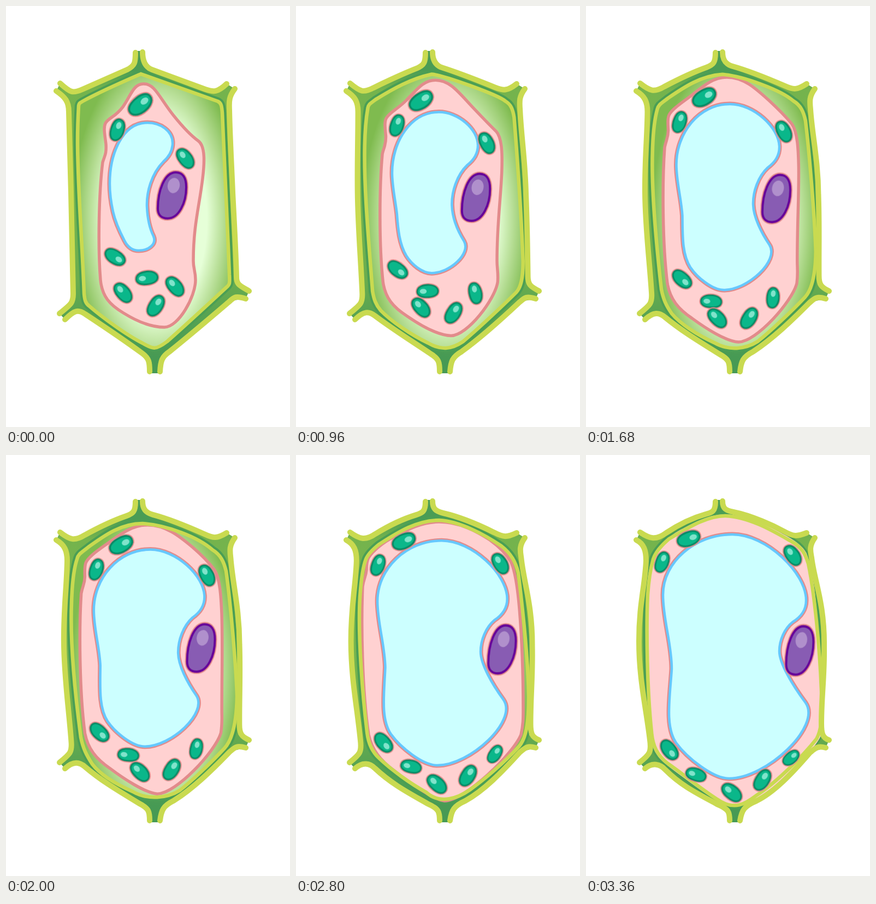
Recreate the animation shown at these times as an HTML page without scripts. Size 520 by 768 pixels, loop 4 s.

```html
<!DOCTYPE html>
<html lang="en">
<head>
<meta charset="utf-8">
<title>Plant cell filling with water</title>
<style>
html, body { margin: 0; width: 100%; height: 100%; overflow: hidden; background: #fff; }
svg { display: block; width: 520px; height: 768px; }
path, .move { animation: 4s infinite; }

.wall { fill: url(#wallTint); animation-name: wall; }
.seam { fill: none; stroke: #4a9e55; stroke-width: 14.5; animation-name: inner; }
.space { fill: url(#glow); animation-name: inner; }
.inner { fill: none; stroke: #c9da50; stroke-width: 6.5; animation-name: inner; }
.outer { fill: none; stroke: #c9da50; stroke-width: 10; stroke-linecap: round; animation-name: outer; }
.plasma { fill: #ffd1d1; stroke: #e28b8b; stroke-width: 5.5; animation-name: plasma; }
.water { fill: #cff; stroke: #66c8ff; stroke-width: 4.5; animation-name: water; }
.water.rim { stroke: #e28b8b; stroke-width: 9; }
.move { animation-name: move; }
.rim { stroke: #e28b8b; }

/* one step per 80 ms, then a hold from 84% */
@keyframes move {
  0% { transform: var(--a); animation-timing-function: steps(12); }
  24% { transform: var(--b); animation-timing-function: steps(13); }
  50% { transform: var(--c); animation-timing-function: steps(17); }
  84%, to { transform: var(--d); }
}
@keyframes water {
  0% {
    d: path("M259,213 C283,213 305,228 305,250 C305,266 297,276 288,284 C266,306 257,340 258,366 C259,390 264,408 270,420 C276,434 262,446 243,446 C230,446 222,438 217,428 C207,409 200,393 196,375 C192,357 190,341 190,324 C190,270 213,213 259,213Z");
    animation-timing-function: steps(42);
  }
  84%, to {
    d: path("M268,145 C330,145 403,215 403,265 C403,283 394,295 378,305 C364,316 354,337 354,358 C354,380 378,420 402,452 C432,495 330,590 262,590 C232,590 185,552 165,525 C144,495 154,440 157,390 C157,345 141,300 141,255 C141,195 200,145 268,145Z");
  }
}
@keyframes plasma {
  0% {
    d: path("M252,142 C273,142 281,168 307,200 C324,221 338,236 352,246 C366,256 363,290 360,315 C354,365 343,400 343,465 C343,480 347,483 347,500 C347,530 316,586 290,586 C262,586 236,573 215,560 C190,545 176,530 173,500 C168,440 170,340 177,285 C181,272 184,270 183,252 C181,235 178,222 182,214 C187,204 200,203 214,184 C229,163 233,142 252,142Z");
    animation-timing-function: steps(35);
  }
  70% {
    d: path("M262,122 C300,122 332,140 355,155 C373,168 385,180 393,194 C402,212 406,245 409,280 C414,340 416,390 416,465 C416,480 416,492 412,510 C398,545 310,630 272,631 C252,629 205,596 180,576 C155,558 139,538 133,510 C121,430 119,310 122,240 C124,225 128,222 129,210 C129,200 130,192 133,187 C140,176 158,160 178,150 C205,135 232,122 262,122Z");
    stroke: #e28b8b;
    animation-timing-function: steps(7);
  }
  84%, to {
    d: path("M255,111 C290,111 330,130 358,146 C380,157 394,167 401,180 C412,205 417,250 420,290 C427,370 431,420 431,470 C431,485 430,500 427,512 C413,542 320,637 270,639 C245,637 195,597 165,575 C140,557 124,545 120,510 C112,430 110,310 114,245 C115,228 117,215 120,203 C123,192 125,185 129,178 C136,166 160,145 180,136 C208,121 230,111 255,111Z");
    stroke: #ffd1d1;
  }
}
@keyframes inner {
  0% {
    d: path("M247,124 C247,124 388,174 388,174 C394,177 395,182 396,195 C398,260 405,380 409,490 C410,506 409,508 406,511 C380,535 320,590 295,612 C275,627 270,627 250,615 C220,600 175,567 152,547 C145,542 144,535 143,525 C139,420 131,330 131,245 C131,220 132,200 133,182 C134,177 135,177 140,174 C175,155 210,140 247,124Z");
    animation-timing-function: steps(25);
  }
  50% {
    d: path("M250,125 C295,128 352,150 378,173 C393,182 399,195 403,212 C411,270 421,380 423,440 C422,490 414,520 400,535 C375,562 340,595 318,612 C295,626 260,630 232,614 C200,600 172,582 158,564 C147,547 141,535 137,515 C127,440 117,340 120,270 C121,235 125,205 130,190 C132,180 140,177 152,167 C180,147 210,125 250,125Z");
    animation-timing-function: steps(10);
  }
  70% {
    d: path("M262,119 C300,121 345,145 376,166 C394,180 402,195 407,215 C415,280 425,370 426,440 C426,490 421,518 408,532 C380,562 345,592 318,611 C298,625 264,639 238,615 C210,600 174,574 152,553 C138,540 132,525 130,505 C122,440 113,330 117,260 C119,230 122,205 128,190 C132,180 142,171 152,163 C185,142 220,119 262,119Z");
    animation-timing-function: steps(7);
  }
  84%, to {
    d: path("M255,111 C300,113 345,140 375,157 C396,168 402,182 407,198 C418,250 428,350 431,430 C432,480 432,500 422,518 C395,552 345,600 312,621 C292,636 272,650 240,628 C210,609 175,580 150,563 C130,548 122,530 120,505 C112,430 110,320 113,255 C115,225 118,208 123,190 C127,178 138,165 152,153 C185,134 220,111 255,111Z");
  }
}
@keyframes outer {
  0% {
    d: path("M237,85 C237,103 236,109 222,116 C195,128 165,141 140,152 C122,160 118,158 99,141 M92,155 C108,166 115,174 115,193 C116,240 118,290 119,340 C120,400 122,460 123,525 C123,542 119,544 98,561 M108,572 C125,555 132,553 145,562 C180,585 220,612 250,634 C262,643 263,650 263,667 M282,667 C283,648 285,640 300,630 C340,598 375,568 408,540 C418,531 420,528 439,534 M445,520 C428,510 422,508 422,495 C421,450 418,400 415,340 C413,290 410,240 409,190 C408,172 409,164 419,151 M404,142 C387,158 380,157 365,152 C340,143 300,128 267,116 C254,111 250,98 250,84");
    animation-timing-function: steps(42);
  }
  84%, to {
    d: path("M237,85 C237,103 231,105 219,108 C190,116 162,132 147,142 C128,156 117,153 99,141 M92,155 C106,162 110,174 110,193 C108,240 97,270 97,340 C97,410 110,460 117,520 C120,542 117,546 98,561 M108,572 C122,560 136,564 145,574 C175,604 205,618 240,637 C262,646 263,652 263,667 M282,667 C285,648 290,640 312,631 C345,615 378,580 410,543 C421,534 424,530 439,534 M445,520 C433,516 431,508 431,490 C431,440 437,400 436,350 C437,270 418,230 413,187 C411,176 408,166 419,151 M404,142 C386,149 380,149 362,139 C345,130 305,111 270,104 C256,101 250,98 250,84");
  }
}
@keyframes wall {
  0% {
    d: path("M238,82 L237,100 L224,115 Q180,134 135,154 L116,155 L99,141 L92,155 L112,172 Q115,260 119,340 Q121,450 122,545 L98,561 L108,572 L128,557 L150,565 Q200,599 250,634 L263,650 L263,670 L282,670 L283,650 L300,630 Q355,583 410,538 L439,534 L445,520 L421,505 Q418,430 415,340 Q411,260 409,175 L419,151 L404,142 L390,155 L365,152 Q315,134 265,115 L251,100 L250,82Z");
    animation-timing-function: steps(42);
  }
  84%, to {
    d: path("M238,82 L237,97 L222,107 Q180,121 146,143 L118,151 L99,141 L92,155 L109,172 Q97,270 97,340 Q97,410 118,545 L98,561 L108,572 L128,563 L146,573 Q185,612 247,639 L263,650 L263,670 L282,670 L283,650 L308,633 Q360,604 410,543 L439,534 L445,520 L428,512 Q436,420 436,350 Q435,265 411,175 L419,151 L404,142 L385,147 L365,141 Q315,113 268,104 L251,97 L250,82Z");
  }
}
</style>
</head>
<body>
<svg viewBox="0 0 520 768" xmlns="http://www.w3.org/2000/svg">
  <defs>
    <linearGradient id="wallTint" gradientUnits="userSpaceOnUse" x1="0" y1="82" x2="0" y2="670">
      <stop offset="0" stop-color="#4a9c55"/>
      <stop offset=".06" stop-color="#4a9c55"/>
      <stop offset=".12" stop-color="#74b34d"/>
      <stop offset=".4" stop-color="#7ab74e"/>
      <stop offset=".71" stop-color="#6aad4e"/>
      <stop offset=".83" stop-color="#55a253"/>
      <stop offset=".95" stop-color="#479a54"/>
    </linearGradient>
    <radialGradient id="glow" gradientUnits="userSpaceOnUse" cx="0" cy="0" r="1" gradientTransform="translate(275 388) scale(155 300)">
      <stop offset=".6" stop-color="#e6ffd8"/>
      <stop offset=".8" stop-color="#b4dc92"/>
      <stop offset="1" stop-color="#7fbb4f"/>
    </radialGradient>
    <clipPath id="shell"><path class="wall"/></clipPath>
    <path id="bean" d="M-19.5,1 C-19.5,-8 -8,-12 3,-11.5 C13,-11 19.5,-6 19.5,0 C19.5,8 10,11.5 -2,11.5 C-12,11.5 -19.5,8 -19.5,1Z"/>
    <path id="core" d="M7,-42 C19,-42 26,-33 26,-15 C26,14 12,42 -8,42 C-20,42 -26,35 -26,24 C-26,-8 -14,-42 7,-42Z"/>
    <g id="plastid">
      <use href="#bean" class="rim" stroke-width="6.5"/>
      <use href="#bean" fill="#0ab78a" stroke="#0a8a66" stroke-width="3"/>
      <ellipse cx="-8.3" cy=".5" rx="6.5" ry="4.7" fill="#80e3cb"/>
    </g>
  </defs>

  <path class="wall"/>
  <g clip-path="url(#shell)"><path class="seam"/></g>
  <path class="space"/>
  <path class="plasma"/>
  <path class="inner"/>
  <path class="outer"/>
  <path class="water rim"/>
  <path class="water"/>

  <g class="move" style="--a:translate(304px,345.5px) scale(1,1);--b:translate(329.5px,349px) scale(.99,1.02);--c:translate(357px,352px) scale(.98,1.03);--d:translate(391.5px,356.5px) scale(.96,1.05)">
    <use href="#core" class="rim" stroke-width="8"/>
    <use href="#core" fill="#885cb3" stroke="#609" stroke-width="4"/>
    <ellipse cx="3" cy="-18" rx="11" ry="14" transform="rotate(12 3 -18)" fill="#b090cc"/>
  </g>

  <use href="#plastid" class="move" style="--a:translate(246px,180px) rotate(322deg) scale(-1.2);--b:translate(229px,173px) rotate(328deg) scale(-1.16);--c:translate(211px,164px) rotate(333deg) scale(-1.12);--d:translate(188px,153px) rotate(342deg) scale(-1.06)"/>
  <use href="#plastid" class="move" style="--a:translate(204px,226px) rotate(110deg) scale(1);--b:translate(185px,218px) rotate(110deg) scale(.98);--c:translate(165.5px,209px) rotate(111deg) scale(.97);--d:translate(139.5px,195.5px) rotate(113deg) scale(.95)"/>
  <use href="#plastid" class="move" style="--a:translate(328.5px,278px) rotate(55deg) scale(1);--b:translate(349.5px,250px) rotate(65deg) scale(1);--c:translate(368px,219.5px) rotate(65deg) scale(1);--d:translate(378.5px,183px) rotate(57deg) scale(1)"/>
  <use href="#plastid" class="move" style="--a:translate(199.5px,458px) rotate(215deg) scale(1);--b:translate(186px,481px) rotate(220deg) scale(1);--c:translate(171px,506px) rotate(226deg) scale(1);--d:translate(152.5px,538px) rotate(235deg) scale(1)"/>
  <use href="#plastid" class="move" style="--a:translate(258px,496px) rotate(-5deg) scale(1);--b:translate(241px,520px) rotate(0deg) scale(.97);--c:translate(224px,547px) rotate(8deg) scale(.95);--d:translate(201.5px,583px) rotate(20deg) scale(.93)"/>
  <use href="#plastid" class="move" style="--a:translate(214.5px,523px) rotate(52deg) scale(1);--b:translate(229px,550px) rotate(50deg) scale(1);--c:translate(245.5px,578px) rotate(47deg) scale(1.01);--d:translate(267px,615.5px) rotate(42deg) scale(1.02)"/>
  <use href="#plastid" class="move" style="--a:translate(274.5px,547px) rotate(125deg) scale(1.02);--b:translate(288.5px,560px) rotate(125deg) scale(1.02);--c:translate(303.5px,574px) rotate(125deg) scale(1.02);--d:translate(323px,593px) rotate(125deg) scale(1.02)"/>
  <use href="#plastid" class="move" style="--a:translate(309.5px,511.5px) rotate(52deg) scale(1);--b:translate(328.5px,524px) rotate(80deg) scale(.96);--c:translate(348.5px,536px) rotate(105deg) scale(.91);--d:translate(375.5px,552.5px) rotate(142deg) scale(.84)"/>
</svg>
</body>
</html>
```
